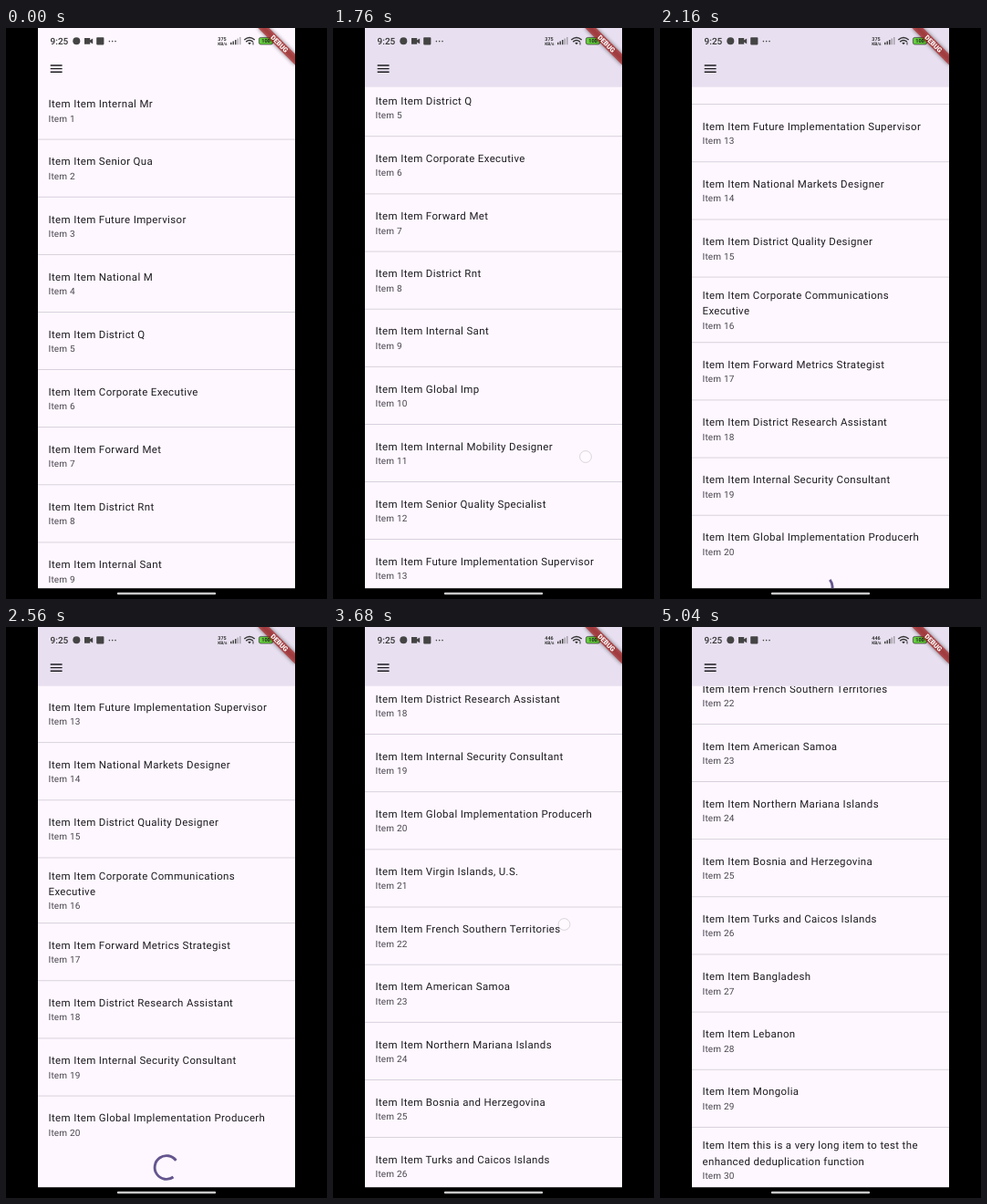
Animation of 352 by 626 pixels, one loop 5280 ms. Source, as an HTML page:

```html
<!DOCTYPE html>
<html lang="en">
<head>
<meta charset="utf-8">
<title>Endless list</title>
<style>
  html, body { margin: 0; width: 100%; height: 100%; overflow: hidden; background: #000; }
  svg { display: block; width: 352px; height: 626px; }
  text { font-family: Roboto, sans-serif; text-rendering: geometricPrecision; }
  .title { font-size: 11.48px; letter-spacing: .36px; fill: #1d1b20; }
  .sub { font-size: 10.04px; letter-spacing: .18px; fill: #49454f; }
  .tiny { font-size: 5.4px; font-weight: 700; fill: #333; text-anchor: middle; }
</style>
</head>
<body>
<svg viewBox="0 0 352 626">
  <defs>
    <clipPath id="screen"><rect x="35" width="282" height="614.3"/></clipPath>
    <clipPath id="view"><rect x="35" y="64.7" width="282" height="549.6"/></clipPath>
    <filter id="soft" x="-20%" y="-80%" width="140%" height="260%"><feGaussianBlur stdDeviation="2"/></filter>
  </defs>
  <rect width="352" height="626"/>
  <g clip-path="url(#screen)">
    <rect x="35" width="282" height="615" fill="#fef7ff"/>
    <g clip-path="url(#view)"><g id="list"></g></g>
    <rect id="bar" x="35" width="282" height="64.7" fill="#e8e0f0"/>
    <path d="M48.7 41H61.6M48.7 44.6H61.6M48.7 48.2H61.6" stroke="#1d1b20" stroke-width="1.43"/>

    <g fill="#444">
      <text x="48.6" y="18" font-size="10" font-weight="500" fill="#333">9:25</text>
      <circle cx="77.3" cy="14.3" r="4"/>
      <path d="M86 11h6.2v2.2l3-1.8v6l-3-1.8v2.2H86z"/>
      <rect x="99.2" y="10.2" width="8.2" height="8.2" rx=".8"/>
      <circle cx="113.4" cy="14.6" r=".8"/><circle cx="116.7" cy="14.6" r=".8"/><circle cx="120" cy="14.6" r=".8"/>
      <text id="speed" class="tiny" x="237" y="14"></text>
      <text class="tiny" x="237.4" y="18.7" style="font-size:4.8px">KB/s</text>
      <path d="M246 15.8h1.5v2.4H246zM248.5 14.4h1.5v3.8h-1.5zM251 13h1.5v5.2H251z"/>
      <path d="M253.5 11.5h1.5v6.7h-1.5zM256 10h1.5v8.2H256z" opacity=".4"/>
    </g>
    <g fill="none" stroke="#333" stroke-width="1.4">
      <path d="M261.3 13Q267 8 272.7 13M263.2 15.1Q267 11.8 270.8 15.1"/>
      <path d="M265.2 16.3L267 18.3L268.8 16.3Q267 15 265.2 16.3z" fill="#333" stroke="none"/>
      <path d="M271 15.5v3" stroke-width="1"/>
    </g>
    <rect x="277.4" y="10.4" width="15.2" height="7.6" rx="2" fill="#62cf3a" stroke="#444" stroke-width=".8"/>
    <rect x="293.4" y="12.6" width="1.2" height="3.2" rx=".5" fill="#444"/>
    <text class="tiny" x="285" y="16.2" style="font-size:5.6px;fill:#222">100</text>

    <g transform="translate(317 0) rotate(45)">
      <rect x="-28.7" y="20.1" width="57.4" height="8.6" opacity=".5" filter="url(#soft)"/>
      <rect x="-28.7" y="20.1" width="57.4" height="8.6" fill="#b71c1c" fill-opacity=".63"/>
      <text y="27" font-size="7.3" font-weight="900" fill="#fff" text-anchor="middle">DEBUG</text>
    </g>
    <circle id="touch" r="6.4" fill="#fff" fill-opacity=".35" stroke="#888" stroke-opacity=".3"/>
  </g>
  <rect x="121.8" y="618.7" width="108.4" height="2.5" rx="1.25" fill="#c8c8c8"/>
</svg>
<script>
const LOOP = 5280, STEP = 80;
const DP = 0.7173, TOP = 64.7, BOTTOM = 614.3;
const PITCH = 88 * DP, EXTRA = 12 * DP;
const END1 = 113, END2 = END1 + 10 * PITCH + EXTRA;
const END3 = 29 * PITCH + EXTRA + 84 * DP - (BOTTOM - TOP);

// A "|" marks a line break.
const names = [
  "Internal Mr", "Senior Qua", "Future Impervisor", "National M", "District Q",
  "Corporate Executive", "Forward Met", "District Rnt", "Internal Sant", "Global Imp",
  "Internal Mobility Designer", "Senior Quality Specialist", "Future Implementation Supervisor",
  "National Markets Designer", "District Quality Designer", "Corporate Communications|Executive",
  "Forward Metrics Strategist", "District Research Assistant", "Internal Security Consultant",
  "Global Implementation Producerh",
  "Virgin Islands, U.S.", "French Southern Territories", "American Samoa", "Northern Mariana Islands",
  "Bosnia and Herzegovina", "Turks and Caicos Islands", "Bangladesh", "Lebanon", "Mongolia",
  "this is a very long item to test the|enhanced deduplication function"
];

const swipes = [
  { start: 0, end: 280, from: 0, to: END1, power: 1.3, peak: 320, x: 265, y0: 420, y1: 310 },
  { start: 1680, end: 2220, from: END1, to: END2, power: 1.575, peak: 2240, x: 277, y0: 470, y1: 273.5 },
  { start: 3440, end: 3960, from: END2, to: END3, power: 1.32, peak: 4000, x: 253.5, y0: 500, y1: 326 }
];
const loads = [
  { born: 80, last: 1120, done: 1280, y: 592.5 + END1 },
  { born: 1930, last: 2960, done: 3120, y: 592.5 + END2 }
];
const tap = { start: 4800, end: 5040, x: 252, y: 39.5 };

const $ = id => document.getElementById(id);
const clamp = v => Math.min(1, Math.max(0, v));

function add(parent, tag, attrs, text) {
  const el = document.createElementNS("http://www.w3.org/2000/svg", tag);
  for (const key in attrs) el.setAttribute(key, attrs[key]);
  if (text) el.textContent = text;
  parent.appendChild(el);
  return el;
}

const list = $("list");
const batches = [0, 1, 2].map(() => add(list, "g", {}));
let rowY = TOP;
names.forEach((name, i) => {
  const g = batches[Math.floor(i / 10)];
  const lines = ("Item Item " + name).split("|");
  const pad = (lines.length > 1 ? 8 : 14) * DP;
  if (i) add(g, "rect", { x: 35, y: rowY - 8.5 * DP, width: 282, height: DP, fill: "#cac4d0" });
  lines.forEach((line, n) =>
    add(g, "text", { class: "title", x: 46.5, y: rowY + pad + (17.47 + 24 * n) * DP }, line));
  add(g, "text", { class: "sub", x: 46.5, y: rowY + pad + (24 * lines.length + 14.8) * DP }, "Item " + (i + 1));
  rowY += PITCH + (lines.length > 1 ? EXTRA : 0);
});
for (const load of loads) {
  load.arc = add(list, "path", { fill: "none", stroke: "#65558f", "stroke-width": 4 * DP });
}

// Cubic Bezier (.4, 0, .2, 1) solved by bisection.
function ease(x) {
  let lo = 0, hi = 1, u = 0.5;
  for (let i = 0; i < 20; i++) {
    u = (lo + hi) / 2;
    const bx = 1.2 * u * (1 - u) ** 2 + 0.6 * u * u * (1 - u) + u ** 3;
    if (bx < x) lo = u; else hi = u;
  }
  return 3 * u * u * (1 - u) + u ** 3;
}

function spin(load, t) {
  const age = Math.max(0, Math.min(t, load.last) - load.born);
  const p = age / 1333 % 1;
  const head = ease(clamp(p * 2)), tail = ease(clamp(p * 2 - 1));
  const a = Math.PI * (-0.5 + 1.5 * tail + 2 * age / 2222 + 0.5 * p);
  const sweep = Math.max(0.01, 1.5 * Math.PI * (head - tail));
  const r = 18 * DP;
  const at = v => `${176 + r * Math.cos(v)} ${load.y + r * Math.sin(v)}`;
  load.arc.setAttribute("d", `M${at(a)}A${r} ${r} 0 ${sweep > Math.PI ? 1 : 0} 1 ${at(a + sweep)}`);
}

const show = (el, on) => el.setAttribute("visibility", on ? "visible" : "hidden");

function draw(t) {
  let offset = 0, stretch = 0, touch = null;
  for (const s of swipes) {
    if (t < s.start) break;
    const left = 1 - clamp((t - s.start) / (s.end - s.start));
    offset = s.to - (s.to - s.from) * left ** s.power;
    stretch = t < s.peak ? 0 : 0.007 * (1 - clamp((t - s.peak) / 240)) ** 1.5;
    const drag = (t - s.start - 80) / 160;
    if (drag >= 0 && drag <= 1) touch = { x: s.x, y: s.y0 + (s.y1 - s.y0) * drag };
  }
  if (t >= tap.start && t < tap.end) touch = tap;

  list.setAttribute("transform",
    `translate(0 ${BOTTOM}) scale(1 ${1 + stretch}) translate(0 ${-BOTTOM - offset})`);
  loads.forEach((load, i) => {
    const done = t >= load.done;
    show(batches[i + 1], done);
    show(load.arc, !done && (i === 0 || t >= loads[i - 1].done));
    spin(load, t);
  });

  $("bar").setAttribute("fill-opacity", clamp(t / 240));
  $("speed").textContent = t < 2720 ? "375" : "446";
  show($("touch"), touch);
  if (touch) {
    $("touch").setAttribute("cx", touch.x);
    $("touch").setAttribute("cy", touch.y);
  }
}

function tick() {
  const t = performance.now() % LOOP;
  draw(Math.floor(t / STEP) * STEP);
  requestAnimationFrame(tick);
}
tick();
</script>
</body>
</html>
```
